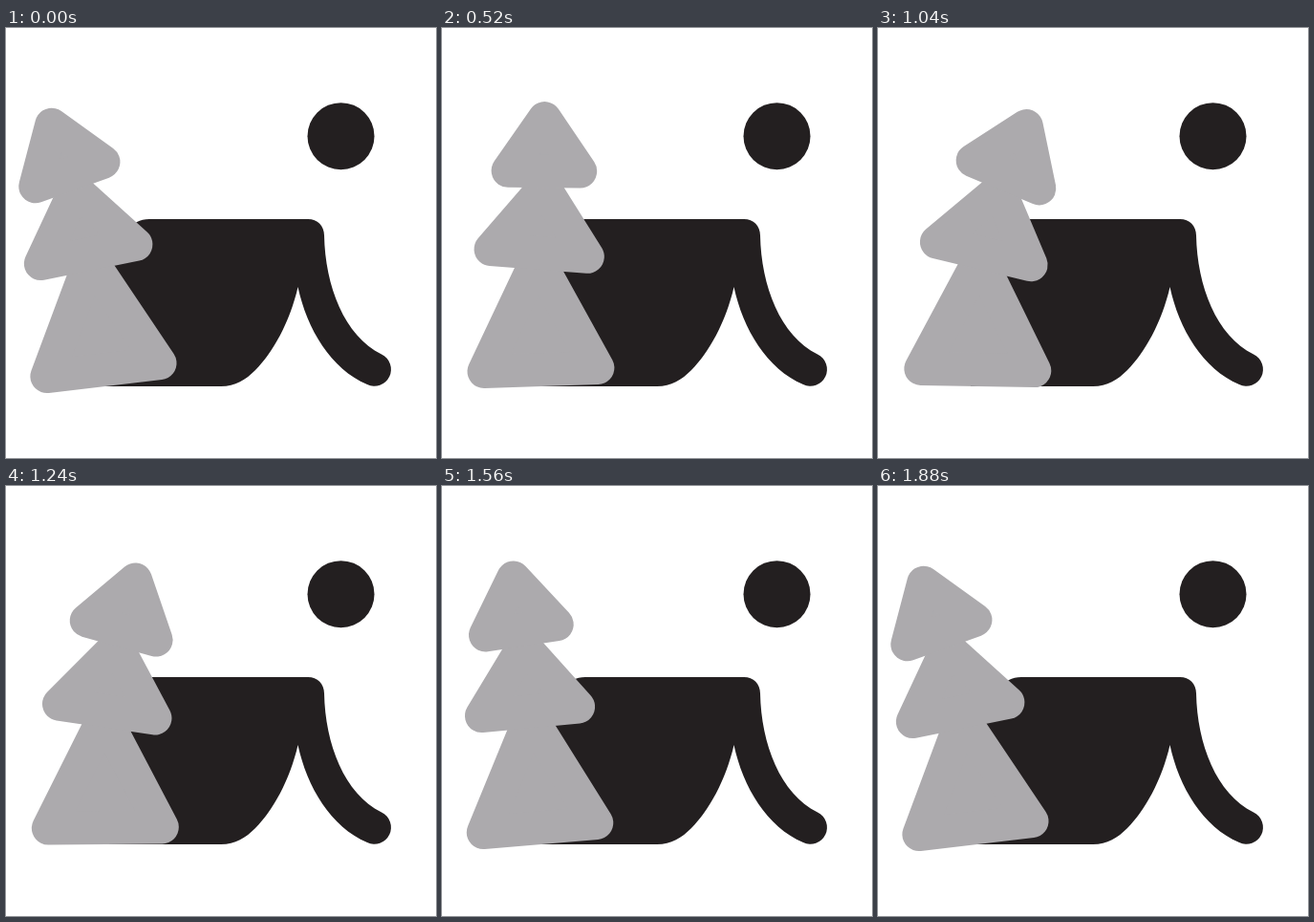
Write an HTML page that moves like this. It is 450x450 px and loops after 1.92 s.

```html
<!DOCTYPE html>
<html lang="en">
<head>
<meta charset="utf-8">
<title>Swaying tree</title>
<style>
  html, body { margin: 0; width: 100%; height: 100%; overflow: hidden; background: #fff; }
  svg { display: block; width: 100%; height: 100%; }
</style>
</head>
<body>
<svg viewBox="0 0 450 450">
  <g fill="#231f20">
    <circle cx="350.5" cy="113.2" r="35"/>
    <path d="M150 200H316C326 200 333 207 333 217C334 270 354 322 393 341.5
             A17.3 17.3 0 0 1 378 373C340 357 315 315 305.5 271
             C297 308 279 340 261 358C251 368 240 375 225 375H97L108 250L128 212Q135 200 150 200Z"/>
  </g>
  <g id="tree" fill="#acaaad" stroke="#acaaad" stroke-width="35" stroke-linejoin="round"></g>
</svg>
<script>
const LOOP = 1920, STEP = 40, END = 1880;
const tree = document.getElementById('tree');

// Each tier hangs on the one below; pivot is relative to the parent's pivot.
// Angles are relative to the parent tier, in degrees.
const tiers = [
  { pivot: [104, 375], half: 59.5, base: -17.5, apex: -133.5, from: -6.7, to: 1.3, start: 0, peak: 920 },
  { pivot: [0, -120.2], half: 50.8, base: -19.5, apex: -88.2, from: -4.7, to: 13.1, start: 0, peak: 920 },
  { pivot: [0, -86], half: 37.8, base: -19.5, apex: -74.5, from: -8.4, to: 9.2, start: 240, peak: 1040 }
];

let parent = tree;
for (const tier of tiers) {
  tier.group = add(parent, 'g');
  add(tier.group, 'path').setAttribute('d',
    `M${-tier.half} ${tier.base}H${tier.half}L0 ${tier.apex}Z`);
  parent = tier.group;
}

function add(node, name) {
  return node.appendChild(document.createElementNS('http://www.w3.org/2000/svg', name));
}

// Cubic Bezier ease with handles at (.42, 0) and (.58, 1)
function ease(p) {
  if (p <= 0) return 0;
  if (p >= 1) return 1;
  let lo = 0, hi = 1;
  for (let i = 0; i < 24; i++) {
    const u = (lo + hi) / 2, v = 1 - u;
    if (1.26 * v * v * u + 1.74 * v * u * u + u ** 3 < p) lo = u; else hi = u;
  }
  return lo * lo * (3 - 2 * lo);
}

function swing({ from, to, start, peak }, t) {
  const amount = t < peak
    ? ease((t - start) / (peak - start))
    : 1 - ease((t - peak) / (END - peak));
  return from + (to - from) * amount;
}

function draw(t) {
  for (const tier of tiers) {
    tier.group.setAttribute('transform',
      `translate(${tier.pivot}) rotate(${swing(tier, t).toFixed(3)})`);
  }
}

let origin;
function tick(now) {
  origin ??= now;
  const t = Math.max(0, now - origin) % LOOP;
  draw(Math.floor(t / STEP) * STEP);
  requestAnimationFrame(tick);
}
draw(0);
requestAnimationFrame(tick);
</script>
</body>
</html>
```
